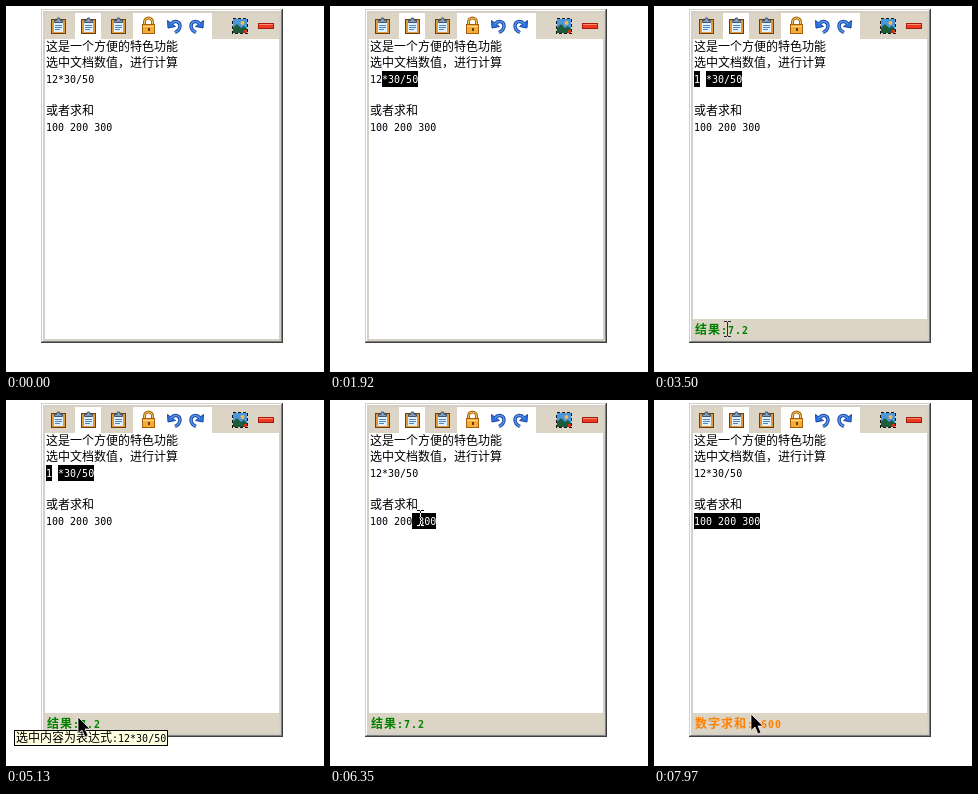
An HTML page that plays this animation: 318 by 366 pixels, repeating every 8 s.

```html
<!DOCTYPE html>
<html lang="zh">
<head>
<meta charset="utf-8">
<style>
html, body { margin: 0; width: 100%; height: 100%; overflow: hidden; background: #fff; }
svg { display: block; width: 318px; height: 366px; isolation: isolate; }
text { font: 12px "Noto Sans Mono CJK SC", "Noto Sans CJK SC", "Noto Sans CJK", monospace; white-space: pre; }
tspan { font-family: "DejaVu Sans Mono", monospace; font-size: 10px; }
.status { font-weight: bold; letter-spacing: 1px; }
.crisp, rect { shape-rendering: crispEdges; }
.invert { mix-blend-mode: difference; }
</style>
</head>
<body>
<svg viewBox="0 0 318 366">
  <defs>
    <g id="clip">
      <rect x="0" y="2" width="15" height="15" rx="1" fill="#6b3f12"/>
      <rect x="1" y="3" width="13" height="13" fill="#e09a3a"/>
      <rect x="3" y="5" width="9" height="10" fill="#e4f1fc"/>
      <path class="crisp" d="M4 8.5h7M4 10.5h7M4 12.5h5" stroke="#4a86c0"/>
      <path d="M3.500 5.500v-2h2l1-2.500h2l1 2.500h2v2z" fill="#7f9dbd" stroke="#3d5570"/>
    </g>
    <g id="turn">
      <path d="M4 6C7 2 13 3 13 8C13 11 11 13 8 14.500" fill="none" stroke="#1747a6" stroke-width="3.400"/>
      <path d="M.5 2.500L1 10L8.500 8.500z" fill="#2f73dc" stroke="#1747a6"/>
      <path d="M4 6C7 2 13 3 13 8C13 11 11 13 8 14.500" fill="none" stroke="#5c9cf0" stroke-width="1.400"/>
    </g>
  </defs>
  <rect width="318" height="366" fill="#fff"/>

  <rect x="35" y="3" width="242" height="334" fill="#d4d0c8"/>
  <path class="crisp" d="M36.500 335V4.500H275" fill="none" stroke="#fff"/>
  <path class="crisp" d="M36 335.500H275.500V4" fill="none" stroke="#808080"/>
  <path class="crisp" d="M35 336.500H276.500V3" fill="none" stroke="#404040"/>
  <rect x="39" y="7" width="234" height="26" fill="#dcd4c4"/>
  <rect x="39" y="33" width="234" height="300" fill="#fff"/>
  <rect x="69" y="7" width="26" height="26" fill="#fff"/>
  <rect x="127" y="7" width="79" height="26" fill="#fff"/>

  <use href="#clip" x="45" y="11"/>
  <use href="#clip" x="75" y="11"/>
  <use href="#clip" x="105" y="11"/>
  <path d="M138.500 20V16a4 4 0 0 1 8 0V20" fill="none" stroke="#a8690f" stroke-width="3"/>
  <path d="M138.500 20V16a4 4 0 0 1 8 0V20" fill="none" stroke="#f3c566"/>
  <rect x="136" y="18" width="13" height="10" rx="1" fill="#a85d0c"/>
  <rect x="137" y="19" width="11" height="8" fill="#f6ad35"/>
  <path class="crisp" d="M137 20.500h11" stroke="#ffd987"/>
  <rect x="142" y="22" width="2" height="3" fill="#6d3c08"/>
  <use href="#turn" x="161" y="12"/>
  <use href="#turn" transform="translate(198 12) scale(-1 1)"/>
  <rect x="227" y="13" width="14" height="14" fill="#4a98dc"/>
  <path d="M227 27v-5l4-4l4 4l3-2l3 3v4z" fill="#1d5c3a"/>
  <circle cx="236.500" cy="17" r="2" fill="#ffb84a"/>
  <rect x="238" y="24" width="3" height="3" fill="#d8321e"/>
  <rect x="226.500" y="12.500" width="15" height="15" fill="none" stroke="#111" stroke-dasharray="3 2"/>
  <rect x="252" y="17" width="16" height="6" rx="1" fill="#a51a0c"/>
  <rect x="253" y="18" width="14" height="4" fill="#ee3a21"/>
  <path class="crisp" d="M253 18.500h14" stroke="#ff8a70"/>

  <g id="lines"></g>
  <rect id="sel1" class="invert" y="65" height="16" fill="#fff"/>
  <rect id="gap" x="46" y="65" width="6" height="16" fill="#fff"/>
  <rect id="sel2" class="invert" y="113" height="16" fill="#fff"/>

  <g id="bar">
    <rect x="39" y="313" width="234" height="20" fill="#dcd4c4"/>
    <text id="result" class="status" x="41" y="328"></text>
  </g>
  <g id="tip">
    <rect x="8" y="330" width="154" height="16" fill="#000"/>
    <rect x="9" y="331" width="152" height="14" fill="#ffffe1"/>
    <text id="hint" x="10" y="342"></text>
  </g>
  <path id="caret" class="crisp invert" d="M0 0h3v1h-3zM4 0h3v1h-3zM3 1h1v14h-1zM0 15h3v1h-3zM4 15h3v1h-3z" fill="#fff"/>
  <path id="arrow" d="M0 0V16.500L4 13L7 20L10 18.500L7 12H12z" fill="#000" stroke="#fff" stroke-width=".7"/>
</svg>
<script>
const LOOP = 8000, LEFT = 40, CELL = 6;
const $ = id => document.getElementById(id);
const show = (id, on) => $(id).setAttribute('visibility', on ? 'visible' : 'hidden');
const within = (t, a, b) => t >= a && t < b;

// Latin runs use a smaller face that keeps the half-width grid
const mixed = s => s.replace(/[\x21-\x7e]+/g, '<tspan>$&</tspan>').replace(/ /g, '<tspan> </tspan>');

const LINES = ['这是一个方便的特色功能', '选中文档数值，进行计算', '12*30/50', '', '或者求和', '100 200 300'];
$('lines').innerHTML = LINES.map((s, i) => `<text x="${LEFT}" y="${45 + i * 16}">${mixed(s)}</text>`).join('');
$('hint').innerHTML = mixed('选中内容为表达式:12*30/50');

const linear = u => u;
const easeIn = u => u ** 1.75;
const easeOut = u => 1 - (1 - u) ** 2.5;

// each move starts where the last one ended; equal times make a jump
const MOVES = [
  { t: [0, 0], to: [235, 327] },
  { t: [360, 360], to: [235, 323] },
  { t: [730, 1390], to: [97, 75], ease: easeOut },
  { t: [1770, 2300], to: [31, 75], ease: easeOut },
  { t: [2670, 3450], to: [73, 323], ease: easeOut, bow: 48 },
  { t: [5130, 5130], to: [72, 318] },
  { t: [5130, 5850], to: [115, 113], ease: easeOut },
  { t: [5940, 6030], to: [117, 119] },
  { t: [6210, 6630], to: [38, 115] },
  { t: [7230, 7230], to: [30, 118] },
  { t: [7230, 7970], to: [97, 314], ease: easeIn, bow: 58 }
];

function pointer(t) {
  let x = 0, y = 0;
  for (const { t: [a, b], to, ease = linear, bow = 0 } of MOVES) {
    if (t < a) break;
    const p = t >= b ? 1 : ease((t - a) / (b - a));
    x += (to[0] - x) * p + bow * Math.sin(Math.PI * p);
    y += (to[1] - y) * p;
  }
  return [Math.round(x), Math.round(y)];
}

// stretches a selection from its right end to the dragged pointer
function select(id, t, end, chars) {
  const [x] = pointer(Math.min(t, end));
  const first = Math.max(0, Math.min(chars, Math.floor((x - LEFT) / CELL) - 1));
  $(id).setAttribute('x', LEFT + first * CELL);
  $(id).setAttribute('width', (chars - first) * CELL);
}

function draw(t) {
  select('sel1', t, 2300, LINES[2].length);
  select('sel2', t, 6630, LINES[5].length);
  show('sel1', within(t, 1770, 6210));
  show('gap', within(t, 2300, 6210));
  show('sel2', t >= 6210);

  const sum = t >= 7230;
  show('bar', t >= 2300);
  $('result').innerHTML = mixed(sum ? '数字求和: 600' : '结果:7.2');
  $('result').setAttribute('fill', sum ? '#ff8000' : '#008000');
  show('tip', within(t, 4010, 5220));

  const [x, y] = pointer(t);
  const hidden = t < 320 || within(t, 1770, 2200) || within(t, 6880, 7230);
  const arrow = t >= 5130 && (y > 308 || within(t, 7230, 7430));
  $('caret').setAttribute('transform', `translate(${x - 3} ${y - 8})`);
  $('arrow').setAttribute('transform', `translate(${x} ${y})`);
  show('caret', !hidden && !arrow);
  show('arrow', !hidden && arrow);
}

const start = performance.now();
function tick() {
  draw((performance.now() - start) % LOOP);
  requestAnimationFrame(tick);
}
tick();
</script>
</body>
</html>
```
